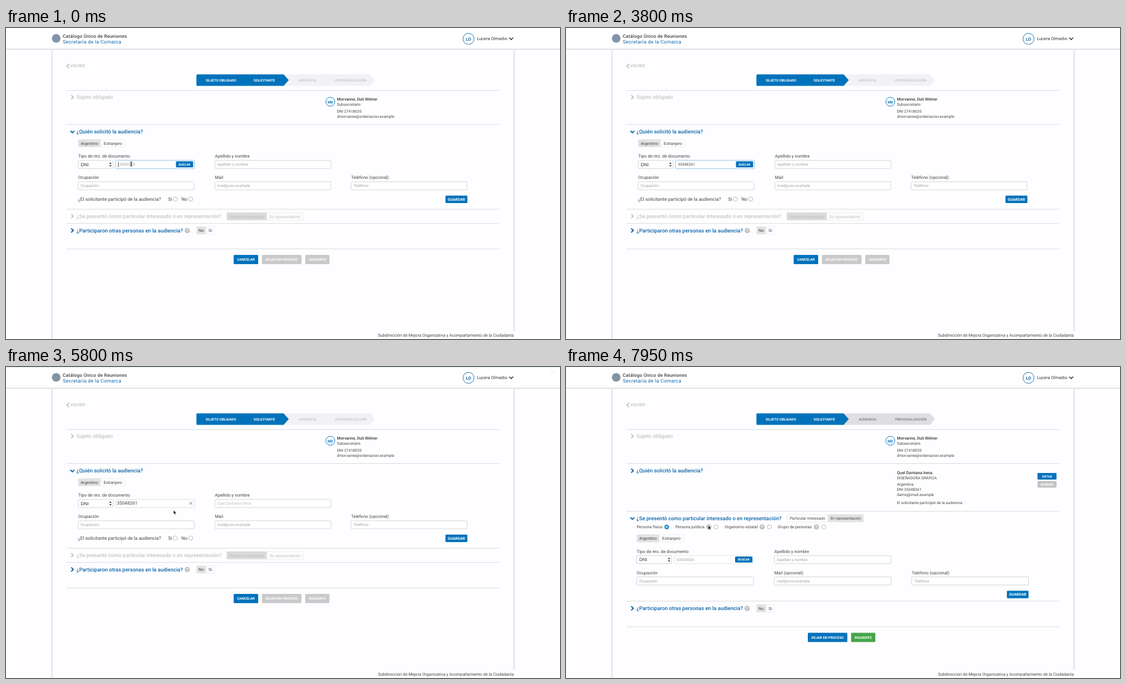
Animation of 960x540 px, one loop 8 s. Source, as an HTML page:

```html
<!DOCTYPE html>
<html lang="es">
<head>
<meta charset="utf-8">
<title>Solicitud de reunión</title>
<style>
html, body { margin: 0; width: 100%; height: 100%; overflow: hidden; background: #fefdff; }
svg { display: block; width: 960px; height: 540px; }
text { font-family: Roboto, sans-serif; text-rendering: geometricPrecision; white-space: pre; }
.system { font-family: "Liberation Sans", Arial, sans-serif; }
</style>
</head>
<body>
<svg id="stage" viewBox="0 0 960 540"></svg>
<script>
const LOOP = 8000;
const BLUE = '#0072bb', HEAD = '#0c66aa', INK = '#454545', DIM = '#c4c4c4', HINT = '#a0a0a0';
const PERSON = 'Quel Damiana Irena', NUMBER = '35048261';

// y is the middle of the capitals
const text = (x, y, s, size, fill = INK, weight = 400, extra = '') =>
  `<text x="${x}" y="${y + size * .355}" font-size="${size}" font-weight="${weight}" fill="${fill}" ${extra}>${s}</text>`;
const middle = 'text-anchor="middle"';
const rect = (x, y, w, h, fill, stroke = 'none', extra = '') =>
  `<rect x="${x}" y="${y}" width="${w}" height="${h}" rx="1.5" fill="${fill}" stroke="${stroke}" stroke-width=".8" ${extra}/>`;
const line = (d, stroke, width = 1) =>
  `<path d="${d}" fill="none" stroke="${stroke}" stroke-width="${width}"/>`;
const rule = y => line(`M105 ${y}H855`, '#dcdcdf');
const group = (id, body, extra = '') => `<g id="${id}" ${extra}>${body}</g>`;

const button = (x, y, w, h, label, size, fill = BLUE, id = '') =>
  rect(x, y, w, h, fill, 'none', id && `id="${id}"`) +
  text(x + w / 2, y + h / 2, label, size, '#fff', 700, middle);

function heading(y, label, { open = false, color = HEAD } = {}) {
  const mark = open ? `M111.5 ${y - 1.2}l3.5 3.4 3.5-3.4` : `M113 ${y - 3.3}l3.7 3.5-3.7 3.5`;
  return line(mark, color, 1.9) + text(122.3, y, label, 9.05, color, 500);
}

function tabs(x, mid, end, y, labels, active, dim = false) {
  const spans = [[x, mid], [mid, end]];
  return spans.map(([a, b], i) =>
    rect(a, y, b - a, 13.5, i === active ? (dim ? '#dadada' : '#e2e2e3') : '#fcfbfd', i === active ? 'none' : '#eeeef0') +
    text((a + b) / 2, y + 7, labels[i], labels[i].length > 10 ? 6.6 : 7.1, dim ? '#bcbcbc' : INK, 400, middle)).join('');
}

const help = (x, y) => `<circle cx="${x}" cy="${y}" r="4.6" fill="#c3c3c3"/>` + text(x, y, '?', 7, '#fff', 700, middle);
const radio = (x, y, on) => on
  ? `<circle cx="${x}" cy="${y}" r="4" fill="#1d8fd8"/><circle cx="${x}" cy="${y}" r="1.4" fill="#fff"/>`
  : `<circle cx="${x}" cy="${y}" r="3.6" fill="#fff" stroke="#aaa" stroke-width=".8"/>`;

const field = (x, y, w, label, hint, id = '') =>
  text(x, y, label, 7.55) + rect(x, y + 7.5, w, 14, '#fff', '#cbcbcf') +
  text(x + 4.3, y + 14.5, hint, 6.7, HINT, 400, id && `id="${id}"`);

function form([a, b, c], y, width, mailLabel, entry, nameId) {
  return text(a, y, 'Tipo de nro. de documento', 7.55) +
    rect(a, y + 7.5, 60.5, 14, '#fff', '#cbcbcf') +
    text(a + 4.5, y + 14.5, 'DNI', 8, '#333', 400, 'class="system"') +
    `<path d="M${a + 54} ${y + 13.6}l2-3 2 3zm0 1.8l2 3 2-3z" fill="#444"/>` +
    entry +
    field(b, y, width, 'Apellido y nombre', 'Apellido y nombre', nameId) +
    field(a, y + 37, width, 'Ocupación', 'Ocupación') +
    field(b, y + 37, width, mailLabel, 'mail@uno.example') +
    field(c, y + 37, width, 'Teléfono (opcional)', 'Teléfono');
}

function steps(fill, color) {
  return `<path d="M478 80.5H631l8.5 10-8.5 10H478z" fill="${fill}"/>` +
    `<path d="M331.5 80.5H481l9 10-9 10H331.5q-1.5 0-1.5-1.5V82q0-1.5 1.5-1.5z" fill="${BLUE}"/>` +
    text(372.5, 90.8, 'SUJETO OBLIGADO', 6, '#fff', 700, middle) +
    text(447.5, 90.8, 'SOLICITANTE', 6, '#fff', 700, middle) +
    text(522.3, 90.8, 'AUDIENCIA', 6, color, 500, middle) +
    text(597.5, 90.8, 'PREVISUALIZACIÓN', 6, color, 500, middle);
}

const frame =
  rect(0, 0, 960, 36.5, '#fff') + line('M0 36.7H960', '#d3d3d8', 1.2) + line('M0 38H960', '#f3f2f5') +
  line('M79.5 38V540', '#cfcfd4', 1.2) + line('M880.5 38V526', '#cfcfd4', 1.2) +
  '<circle cx="87" cy="18" r="7.5" fill="#8194a8"/>' +
  text(98.3, 14.3, 'Catálogo Único de Reuniones', 8, '#404040', 500, 'letter-spacing=".23"') +
  text(98.5, 24, 'Secretaría de la Comarca', 8.5, HEAD, 400, 'letter-spacing=".27"') +
  `<circle cx="801.5" cy="18.8" r="9.6" fill="#fff" stroke="${HEAD}" stroke-width=".9"/>` +
  text(801.5, 19.3, 'LO', 7.5, HEAD, 700, middle) +
  text(816, 18.5, 'Lucera Olmedio', 7.6, '#383838') +
  line('M872 16.7l3.4 3.4 3.4-3.4', '#333', 1.5) +
  line('M109.2 62.4l-3.5 3.6 3.5 3.6', '#b9b9b9', 1.6) + text(111, 66, 'VOLVER', 7, '#bdbdbd', 500) +
  rule(108.5) + heading(120, 'Sujeto obligado', { color: DIM }) +
  `<circle cx="562" cy="128" r="7.8" fill="#fff" stroke="${BLUE}" stroke-width=".9"/>` +
  text(562, 128.3, 'MD', 6.2, BLUE, 700, middle) +
  text(573.5, 123.7, 'Morvanne, Duli Welner', 7, '#333', 500) +
  text(573.5, 132.8, 'Subsecretario', 6.65) +
  text(573.5, 144.3, 'DNI 27418035', 6.65) +
  text(573.5, 153.3, 'dmorvanne@ordenacion.example', 6.65) +
  rule(167.5) +
  text(880, 533.5, 'Subdirección de Mejora Organizativa y Acompañamiento de la Ciudadanía', 7.2, INK, 400, 'text-anchor="end"');

const entry =
  rect(188.7, 229.2, 138.6, 15.6, 'none', '#cfe5f8', 'id="glow" stroke-width="2"') +
  rect(190, 230, 136.5, 14, '#fff', '#d5d5d9', 'id="box"') +
  text(194, 237, '', 6.6, INK, 400, 'id="typed"') +
  '<rect id="caret" y="232.5" width=".7" height="9" fill="#333"/>' +
  group('search', button(294.5, 231.5, 29.8, 10.5, 'BUSCAR', 5.2, BLUE, 'searchBox')) +
  group('chosen', text(192, 236.6, NUMBER, 8) + line('M318.2 234.2l4.4 4.6m0-4.6l-4.4 4.6', '#b5b5b5', 1.5));

const first = steps('#f2f1f3', '#c3c3c5') +
  heading(179.8, '¿Quién solicitó la audiencia?', { open: true }) +
  tabs(125, 164, 206.5, 193.2, ['Argentino', 'Extranjero'], 0) +
  form([125, 362, 598], 222.5, 201, 'Mail', entry, 'name') +
  text(125, 296.7, '¿El solicitante participó de la audiencia?', 8.1) +
  text(281, 296.7, 'Si', 8.1) + radio(293.5, 297) + text(304, 296.7, 'No', 8.1) + radio(320, 297) +
  button(761.5, 291, 38, 13, 'GUARDAR', 6.5) +
  rule(314.7) + heading(326.7, '¿Se presentó como particular interesado o en representación?', { color: DIM }) +
  tabs(382.5, 452, 515.5, 320.3, ['Particular interesado', 'En representación'], 0, true) +
  rule(339.3) + heading(351.3, '¿Participaron otras personas en la audiencia?') + help(314, 351.7) +
  tabs(330, 346.5, 361.5, 344.8, ['No', 'Si'], 0) +
  rule(383.6) +
  button(394.5, 394, 42.5, 16, 'CANCELAR', 6) +
  button(443.5, 394, 68.5, 16, 'DEJAR EN PROCESO', 6, '#c9c9cb') +
  button(518.5, 394, 42, 16, 'SIGUIENTE', 6, '#c9c9cb') +
  group('list', rect(189.8, 244.6, 136.7, 12.2, '#fff', '#dcdce0') +
    text(193, 250.6, `${NUMBER} ${PERSON}`, 8, '#111', 400, 'class="system"'));

const kinds = [['Persona física', 122.5, 0, 174.5], ['Persona jurídica', 189.5, 247.5, 260],
  ['Organismo estatal', 275, 340, 352.5], ['Grupo de personas', 367, 434, 446.5]];

const second = steps('#dfdee0', '#767678') +
  heading(179.8, '¿Quién solicitó la audiencia?') +
  text(573.5, 183.3, PERSON, 7, '#333', 500) +
  ['DISEÑADORA GRÁFICA', 'Argentina', `DNI ${NUMBER}`, 'damiq@mail.example', 'El solicitante participió de la audiencia']
    .map((s, i) => text(573.5, [192.3, 203.8, 212.8, 221.8, 236][i], s, 6.65)).join('') +
  button(817, 184, 33, 11.5, 'EDITAR', 5.2) +
  button(817, 198, 33, 11.5, 'BORRAR', 5.6, '#c3c3c5') +
  rule(250.5) + heading(262.3, '¿Se presentó como particular interesado o en representación?', { open: true }) +
  tabs(383, 454, 515.5, 255.8, ['Particular interesado', 'En representación'], 1) +
  kinds.map(([s, x, h, r]) => text(x, 277.2, s, 7) + (h ? help(h, 277.7) : '') + radio(r, 277.7, !h)).join('') +
  tabs(122.5, 161.5, 204, 290.7, ['Argentino', 'Extranjero'], 0) +
  form([122.5, 361, 599], 320, 202.5, 'Mail (opcional)',
    rect(187.5, 327.3, 136.5, 14, '#fff', '#dcdce0') + text(191.8, 334.5, '00000000', 6.6, HINT) +
    button(293, 329, 30, 10.5, 'BUSCAR', 5.2)) +
  button(764, 388.5, 37.5, 13, 'GUARDAR', 6.5) +
  rule(406.5) + heading(418.8, '¿Participaron otras personas en la audiencia?') + help(314, 419.2) +
  tabs(330, 346.5, 361.5, 412.3, ['No', 'Si'], 0) +
  rule(451) +
  button(419, 461.5, 68.5, 16, 'DEJAR EN PROCESO', 6) +
  button(494, 461.5, 42, 16, 'SIGUIENTE', 6, '#45a548');

const cursors =
  group('ibeam', line('M-1.8-4q1.8 0 1.8 1V3q0 1-1.8 1M1.8-4q-1.8 0-1.8 1V3q0 1 1.8 1', '#333', .9)) +
  group('arrow', '<path d="M0 0V7.2L1.6 5.8 2.7 8.3 3.9 7.8 2.8 5.3H5z" fill="#000" stroke="#fff" stroke-width=".6"/>') +
  group('hand', '<path d="M-.6.4q.8-.8 1.4 0V3l3.6.8q1 .4.8 1.6L4.6 8.4H.8L-1.6 5q0-1 1 -.6z" fill="#fff" stroke="#222" stroke-width=".8"/>');

const stage = document.getElementById('stage');
stage.innerHTML = frame + group('first', first) + group('second', second) +
  group('loading', '<rect id="bar" height="1.2" fill="#2299dd"/>' +
    group('spinner', line('M946.8 8.6A3.6 3.6 0 1 0 949.5 15.1', '#2299dd', 1.1))) +
  group('cursor', cursors);

const el = Object.fromEntries([...stage.querySelectorAll('[id]')].map(n => [n.id, n]));
const set = (id, values) => { for (const k in values) el[id].setAttribute(k, values[k]); };
const show = (id, on) => { el[id].style.display = on ? '' : 'none'; };

const KEYS = [900, 1130, 1380, 1900, 2250, 2600, 2920, 3260];
const FOCUS_LOST = 4750, LISTED = 5200, PICKED = 5800, SAVED = 6900;
const PATH = [[0, 217, 236], [4250, 217, 236], [4650, 298.8, 236.8], [5380, 298.8, 236.8], [5600, 290.3, 248.5],
  [SAVED, 290.3, 248.5], [SAVED + 1, 440, 268], [7100, 464.6, 263.8], [7380, 464.6, 263.8], [7820, 246.5, 275]];

function pointer(t) {
  const i = PATH.findIndex(p => p[0] > t);
  if (i < 0) return PATH[PATH.length - 1].slice(1);
  const [t0, x0, y0] = PATH[i - 1], [t1, x1, y1] = PATH[i];
  const u = (t - t0) / (t1 - t0), e = u * u * (3 - 2 * u);
  return [x0 + (x1 - x0) * e, y0 + (y1 - y0) * e];
}

function cursorKind(t, x, y) {
  if (t < LISTED && x < 294) return 'ibeam';
  if (t < PICKED) return 'hand';
  return t >= SAVED && x > 383 && y < 269 ? 'hand' : 'arrow';
}

function draw(t) {
  const count = KEYS.filter(k => k <= t).length;
  const lastKey = count ? KEYS[count - 1] : 0;
  const focus = t < FOCUS_LOST, picked = t >= PICKED;

  show('first', t < SAVED);
  show('second', t >= SAVED);
  show('glow', focus);
  set('box', { stroke: focus ? '#8fc1ea' : '#d5d5d9' });
  el.typed.textContent = count ? NUMBER.slice(0, count) : '00000000';
  set('typed', { fill: count ? INK : HINT });
  show('typed', !picked);
  show('caret', focus && (t - lastKey) % 1000 < 500);
  set('caret', { x: 194 + count * 6.6 * .5615 });
  show('search', !picked);
  show('chosen', picked);
  show('list', t >= LISTED && !picked);
  el.name.textContent = picked ? PERSON : 'Apellido y nombre';
  set('name', { fill: picked ? '#bababa' : HINT });

  const loading = t >= 4800 && t < 5850;
  show('loading', loading);
  if (loading) {
    set('bar', { width: t < 5150 ? 960 * (1 - Math.exp((4780 - t) / 180)) : 960 });
    set('spinner', { transform: `rotate(${(t - 5300) * .9} 947.5 12)` });
    set('loading', { opacity: Math.min(1, (5850 - t) / 350) });
  }

  const [x, y] = pointer(t), kind = cursorKind(t, x, y);
  show('cursor', t < KEYS[0] || t >= 4250);
  set('cursor', { transform: `translate(${x} ${y})` });
  for (const k of ['ibeam', 'arrow', 'hand']) show(k, k === kind);
  set('searchBox', { fill: kind === 'hand' && x > 294 ? '#2290d8' : BLUE });
}

const start = performance.now();
function tick() {
  draw((performance.now() - start) % LOOP);
  requestAnimationFrame(tick);
}
tick();
</script>
</body>
</html>
```
